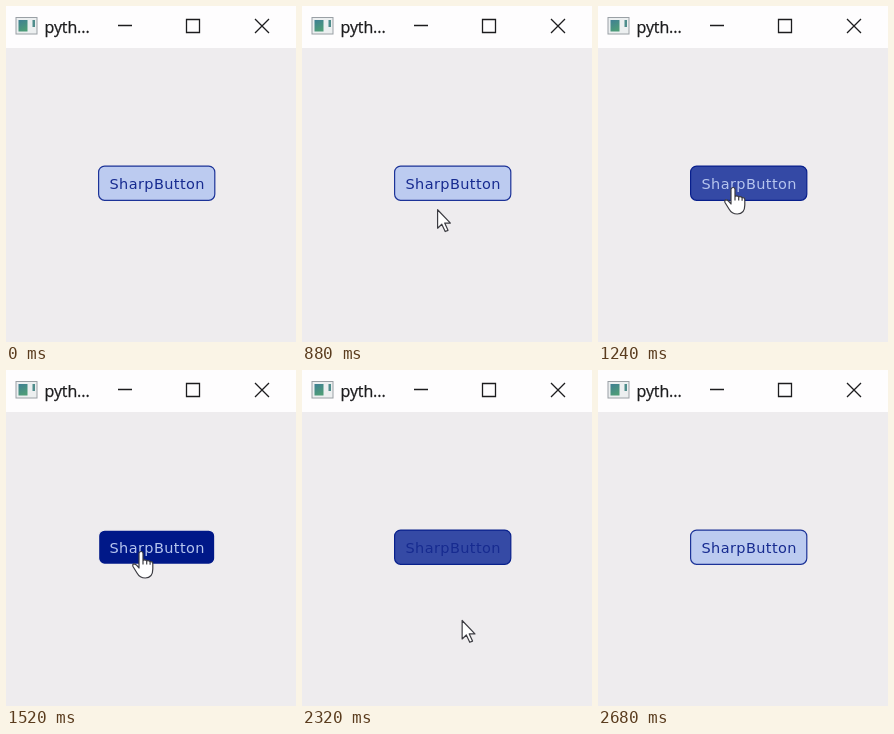
These frames come from a looping animation (290 by 336 pixels, 2.72 s). An HTML page:

```html
<!DOCTYPE html>
<html lang="en">
<head>
<meta charset="utf-8">
<style>
  html, body { margin: 0; height: 100%; overflow: hidden; background: #eeecee; }
  svg { display: block; width: 290px; height: 336px; }
  .title { font: 16px "Open Sans", sans-serif; letter-spacing: -.1px; fill: #1c1c1e; stroke: #1c1c1e; stroke-width: .25; }
  .label { font: 14.5px "DejaVu Sans", sans-serif; letter-spacing: .4px; text-anchor: middle; }
  .controls { fill: none; stroke: #1c1c1e; stroke-width: 1.3; }
  .cursor { fill: #fff; stroke: #3c3c42; stroke-width: 1.2; stroke-linejoin: round; }
</style>
</head>
<body>
<svg viewBox="0 0 290 336">
  <defs>
    <linearGradient id="pane" x2="0.4" y2="1">
      <stop stop-color="#3f7f94"/>
      <stop offset="1" stop-color="#4d9c78"/>
    </linearGradient>
  </defs>
  <rect width="290" height="336" fill="#eeecee"/>
  <rect width="290" height="42" fill="#fefdfe"/>

  <rect x="10" y="11.5" width="21" height="16.5" fill="#eceff0" stroke="#9aa0a5"/>
  <rect x="12.5" y="14" width="9" height="11.5" fill="url(#pane)"/>
  <rect x="26.5" y="14" width="2.500" height="7" fill="#4f8d8c"/>
  <text class="title" x="38.5" y="26.500">pyth...</text>
  <path class="controls" d="M112 19.500h14M180.500 13.500h13v13h-13zM249 13l14 14m0-14l-14 14"/>

  <rect id="button" x="92.6" y="160.100" width="116.200" height="34.200" rx="6" stroke-width="1.2"/>
  <text id="label" class="label" x="151.2" y="183">SharpButton</text>

  <g id="cursor" class="cursor">
    <path id="arrow" d="M0-.5V18l4.200-4 3.400 7.300 2.800-1.200-3.300-7.200h5.700z"/>
    <path id="hand" d="M-2 17V2.500a2 2 0 0 1 4 0V9.500q2.200-1.200 3.700.4 2.200-.8 3.400.8 2.700-.6 2.700 2.100V18q0 9-7.500 9-5.500 0-8.300-5l-4-6.500q-.8-2.500 1.200-2.700 1.800 0 4.800 4.200zM2 9.500v4M5.700 10v3.500M9.100 10.700v3"/>
  </g>
</svg>
<script>
const LOOP = 2720, STEP = 40, FADE = 400;
const ENTER = 950, LEAVE = 2208;
const LIGHT = [188, 203, 240], DARK = [0, 24, 136];

const [button, label, cursor, arrow, hand] =
  ["button", "label", "cursor", "arrow", "hand"].map(id => document.getElementById(id));
const clamp = v => Math.min(1, Math.max(0, v));
const rgb = c => `rgb(${c.map(Math.round)})`;
const mix = k => rgb(LIGHT.map((c, i) => c + (DARK[i] - c) * k));
const show = (el, on) => el.setAttribute("visibility", on ? "visible" : "hidden");

// The pointer slows down onto the button, rests, then drops out of the window.
function pointer(t) {
  if (t < 2160) {
    const rest = (1 - clamp((t - 560) / 520)) ** 2;
    return [135 + 4 * rest, 181 + 157 * rest];
  }
  const u = (t - 2160) / 280;
  return [135 + 44 * u, 181 + 149 * u ** 1.35];
}

function draw(t) {
  const hover = t >= ENTER && t < LEAVE;
  const pressed = t >= 1480 && t < 1600;
  const fill = clamp((t - ENTER) / FADE) - clamp((t - LEAVE) / FADE);

  button.setAttribute("fill", mix(fill));
  button.setAttribute("stroke", pressed ? "#eeecee" : mix(0.85 + 0.15 * fill));
  label.setAttribute("fill", hover ? "#b6c5ee" : "#172b90");
  cursor.setAttribute("transform", `translate(${pointer(t)})`);
  show(arrow, !hover);
  show(hand, hover);
}

function tick() {
  draw(Math.floor(performance.now() % LOOP / STEP) * STEP);
  requestAnimationFrame(tick);
}
tick();
</script>
</body>
</html>
```
